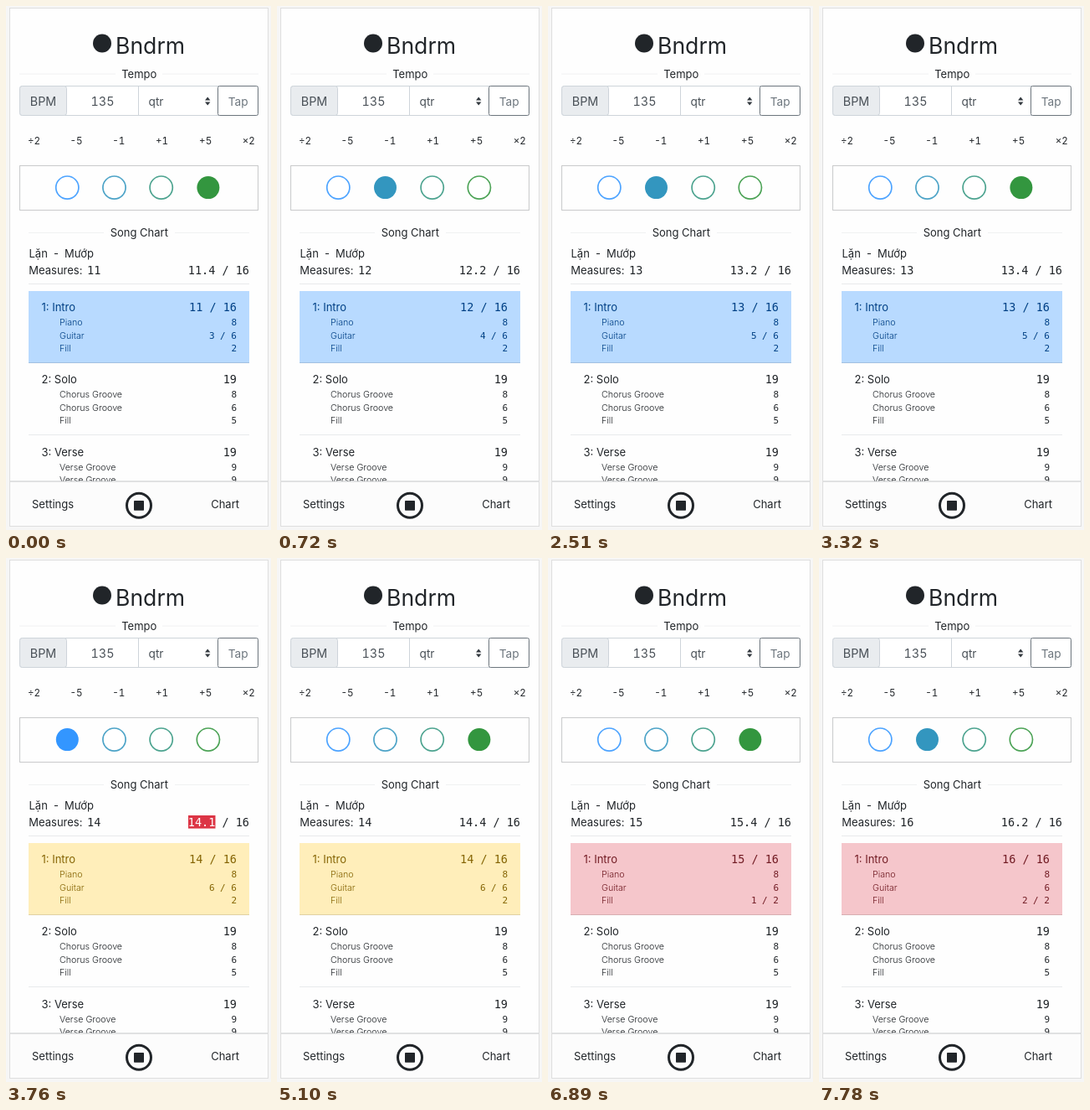
An HTML page for the animation above (8 s loop, 317x625 px).

```html
<!DOCTYPE html>
<html lang="en">
<head>
<meta charset="utf-8">
<title>Practice metronome</title>
<style>
  html, body { margin: 0; width: 100%; height: 100%; overflow: hidden; background: #f6f6f6; }
  svg { display: block; width: 317px; height: 625px; }
  text { font: 13px Inter, "Open Sans", sans-serif; fill: #212529; white-space: pre; }
  .mono { font-family: "DejaVu Sans Mono", monospace; font-size: 13.5px; }
  .small { font-size: 10.7px; font-weight: 300; }
  .mono.small { font-size: 11px; font-weight: 400; }
  .num { font-variant-numeric: tabular-nums; }
</style>
</head>
<body>
<svg id="stage" viewBox="0 0 317 625"></svg>
<script>
const stage = document.getElementById("stage");

function add(tag, attrs, parent = stage) {
  const el = document.createElementNS("http://www.w3.org/2000/svg", tag);
  for (const key in attrs) el.setAttribute(key, attrs[key]);
  return parent.appendChild(el);
}
function label(x, y, content, attrs = {}, parent = stage) {
  const el = add("text", { x, y, ...attrs }, parent);
  el.textContent = content;
  return el;
}
const box = (x, y, width, height, fill, stroke = "none", attrs = {}) =>
  add("rect", { x, y, width, height, fill, stroke, ...attrs });
const rule = (x1, x2, y, stroke = "#e8eaec") => add("path", { d: `M${x1} ${y}H${x2}`, stroke });
const middle = { "text-anchor": "middle" };
const mono = { class: "mono", "text-anchor": "end" };
const monoSmall = { class: "mono small", "text-anchor": "end" };

// Panel and heading
box(4.5, 2.5, 309, 618, "#fefefe", "#dedede");
add("circle", { cx: 115, cy: 44.5, r: 11, fill: "#212529" });
label(131, 57, "Bndrm", { style: "font-size:26.6px" });
rule(16, 131, 81, "#f0f1f2");
rule(187, 302, 81, "#f0f1f2");
label(159.3, 85.5, "Tempo", middle);

// Tempo controls
box(16.5, 95.5, 285, 35, "#fff", "#ced4da", { rx: 3 });
box(16.5, 95.5, 56, 35, "#e9ecef", "#ced4da", { rx: 3 });
add("path", { d: "M158.5 95.5V130.5", stroke: "#ced4da" });
box(253.5, 95.5, 48, 35, "#fff", "#6c757d", { rx: 2 });
label(44.5, 119, "BPM", { ...middle, style: "font-size:14.3px;fill:#495057" });
label(115.5, 119.3, "135", { ...middle, class: "num", style: "font-size:14.3px;fill:#495057" });
label(170.5, 118.5, "qtr", { style: "font-size:13.7px;fill:#495057" });
label(277.7, 118.5, "Tap", { ...middle, style: "font-size:13.7px;fill:#6c757d" });
add("path", { d: "M238 112.6l3.2-4 3.2 4zM238 114.4l3.2 4 3.2-4z", fill: "#343a40" });
["÷2", "-5", "-1", "+1", "+5", "×2"].forEach((step, i) =>
  label([33.5, 84.1, 134.8, 186.5, 238.7, 290.3][i], 165, step,
    { ...middle, class: "num", style: "font-size:11.7px" }));

// Beat lamps
box(16.5, 190.5, 285, 53, "#fefefe", "#c9cacb");
const lamps = [255, 191, 127, 63].map((blue, i) => ({
  color: `rgb(51,150,${blue})`,
  el: add("circle", {
    cx: 73.3 + i * 56.2, cy: 216.6, "stroke-width": 1.7, "stroke-opacity": 0.88
  })
}));

// Song chart
rule(27, 117, 270.5, "#f0f1f2");
rule(202, 291, 270.5, "#f0f1f2");
label(159.3, 274.5, "Song Chart", middle);
label(27.5, 299.5, "Lặn");
label(57, 299.5, "-");
label(70, 299.5, "Mướp");
label(27.3, 319.5, "Measures:");
const measureText = label(97, 319.5, "", { class: "mono" });
const badge = box(218, 307, 32.5, 15.6, "#dc3545");
const positionText = label(291, 319.5, "", mono);
const positionNow = add("tspan", {}, positionText);
add("tspan", {}, positionText).textContent = " / 16";
rule(27, 291, 331.5);

const highlight = box(27, 340, 264, 86, "#b8daff");

function section(y, title, total, parts) {
  const group = add("g", {});
  const texts = [label(42.5, y, title, {}, group)];
  const counts = [label(276, y, total, mono, group)];
  parts.forEach(([name, count], i) => {
    const rowY = y + 17 + i * 15.7;
    texts.push(label(64, rowY, name, { class: "small" }, group));
    counts.push(label(276, rowY, count, monoSmall, group));
  });
  return { texts, counts };
}
const introParts = [["Piano", 8], ["Guitar", 6], ["Fill", 2]];
const intro = section(364, "1: Intro", 16, introParts);
rule(27, 291, 425.5, "rgba(0,0,0,.12)");
section(450, "2: Solo", 19, [["Chorus Groove", 8], ["Chorus Groove", 6], ["Fill", 5]]);
rule(27, 291, 511.5);
section(536.5, "3: Verse", 19, [["Verse Groove", 9], ["Verse Groove", 9]]);

// Footer
box(5, 567, 308, 53, "#fcfcfc");
rule(5, 313, 567, "#c3c5c7");
label(31, 599, "Settings");
label(279, 599, "Chart", { "text-anchor": "end" });
add("circle", { cx: 159, cy: 595.8, r: 14.5, fill: "none", stroke: "#212529", "stroke-width": 3 });
box(153, 590, 12, 11.8, "#212529", "none", { rx: 0.8 });

const LOOP = 8000;
const FIRST_BEAT = 43; // measure 11, beat 4
const ticks = [270, 720, 1170, 1610, 2060, 2510, 2960, 3320, 3760,
  4210, 4650, 5100, 5540, 5990, 6440, 6890, 7330, 7780];

function theme(measure) {
  if (measure < 14) return ["#b8daff", "#004085"];
  if (measure === 14) return ["#ffeeba", "#856404"];
  return ["#f5c6cb", "#721c24"];
}

function render(time) {
  const index = FIRST_BEAT + ticks.filter(tick => tick <= time).length;
  const measure = Math.floor(index / 4) + 1;
  const beat = index % 4;

  lamps.forEach(({ el, color }, i) => {
    const on = i === beat;
    el.setAttribute("r", on ? 13.5 : 13.6);
    el.setAttribute("fill", on ? color : "#fff");
    el.setAttribute("stroke", on ? "none" : color);
  });

  measureText.textContent = measure;
  positionNow.textContent = `${measure}.${beat + 1}`;
  positionNow.style.fill = beat === 0 ? "#fff" : "#212529";
  badge.setAttribute("visibility", beat === 0 ? "visible" : "hidden");

  const [back, ink] = theme(measure);
  highlight.setAttribute("fill", back);
  [...intro.texts, ...intro.counts].forEach(el => { el.style.fill = ink; });
  intro.counts[0].textContent = `${measure} / 16`;
  let before = 0;
  introParts.forEach(([, count], i) => {
    const played = measure - before;
    const active = played > 0 && played <= count;
    intro.counts[i + 1].textContent = active ? `${played} / ${count}` : count;
    before += count;
  });
}

const start = performance.now();
function loop() {
  render((performance.now() - start) % LOOP);
  requestAnimationFrame(loop);
}
loop();
</script>
</body>
</html>
```
